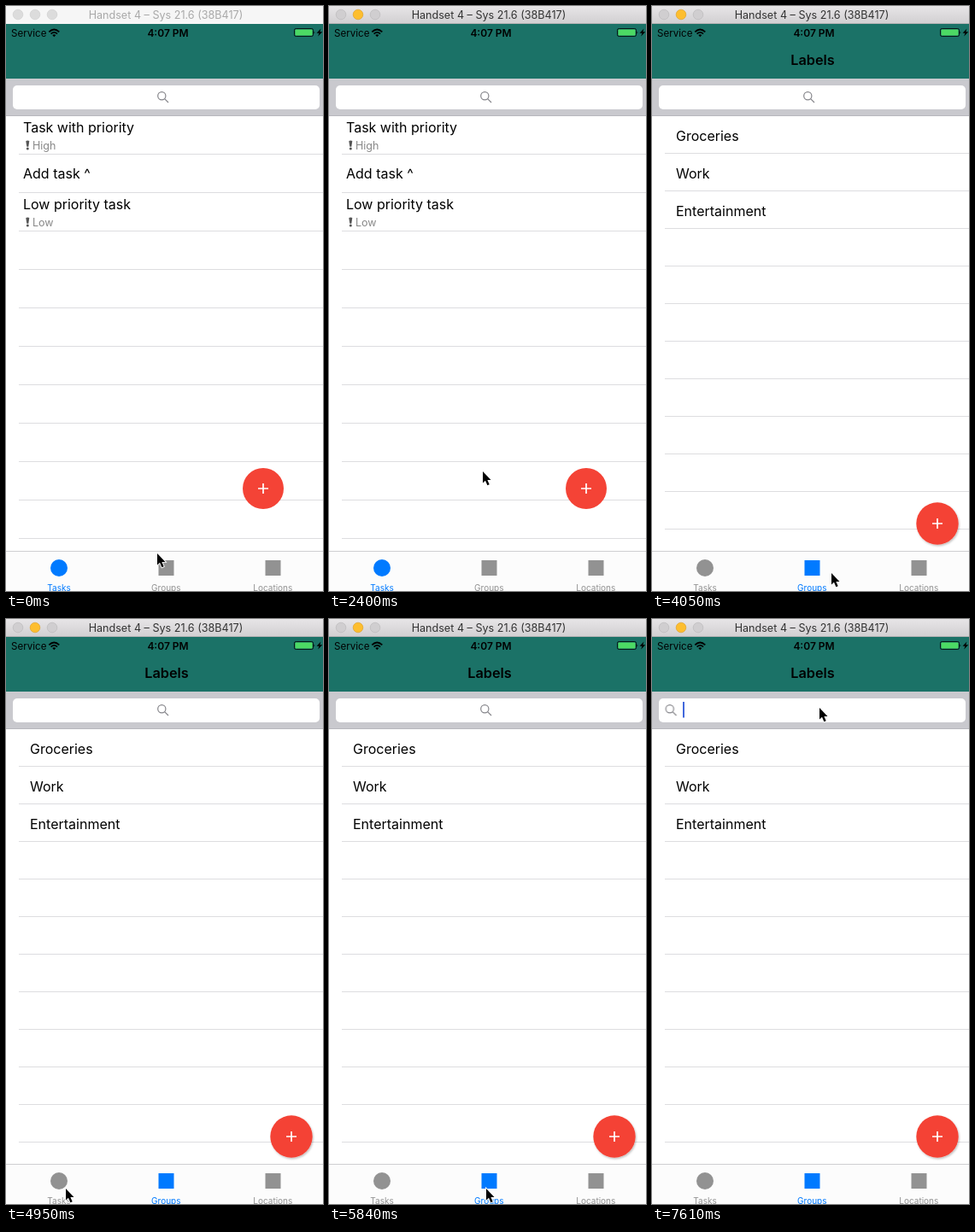
An HTML page that plays this animation: 371 by 685 pixels, repeating every 8 s.

```html
<!DOCTYPE html>
<html lang="en">
<head>
<meta charset="utf-8">
<title>Task list</title>
<style>
  html, body { margin: 0; width: 100%; height: 100%; overflow: hidden; background: #fff; }
  svg { display: block; width: 371px; height: 685px; font-family: Inter, "Open Sans", sans-serif; }
  .mid { text-anchor: middle; }
  .row { font-size: 16px; }
  .sub { font-size: 12.5px; fill: #888; }
  .tab { font-size: 10px; text-anchor: middle; }

  /* Everything changes in hard steps on one 8 s clock. */
  .anim { animation: 8s step-end infinite; }
  .idle { animation-name: idle; }
  .focused { animation-name: focused; }
  .tasks { animation-name: tasks; }
  .groups { animation-name: groups; }
  .tasks-tab { animation-name: tasks-tab; }
  .groups-tab { animation-name: groups-tab; }
  .glass { animation-name: glass; }
  .caret { animation-name: caret; }
  .pointer { animation-name: pointer; }

  @keyframes idle { 0% { visibility: visible } 30%, 100% { visibility: hidden } }
  @keyframes focused { 0% { visibility: hidden } 30%, 100% { visibility: visible } }
  @keyframes tasks {
    0%, 65.625% { visibility: visible }
    48.75%, 73%, 100% { visibility: hidden }
  }
  @keyframes groups {
    0%, 65.625% { visibility: hidden }
    48.75%, 73%, 100% { visibility: visible }
  }
  @keyframes tasks-tab {
    0%, 65.625% { color: #007aff }
    48.75%, 73%, 100% { color: #929292 }
  }
  @keyframes groups-tab {
    0%, 65.625% { color: #929292 }
    48.75%, 73%, 100% { color: #007aff }
  }
  @keyframes glass {
    0% { transform: none }
    91.375% { transform: translateX(-110px) }
    93.25%, 100% { transform: translateX(-161.5px) }
  }
  @keyframes caret { 0% { visibility: hidden } 93.25%, 100% { visibility: visible } }
  @keyframes pointer {
    0% { transform: translate(177px, 641px) }
    5.625% { transform: translate(178px, 590px) }
    7.5% { transform: translate(180px, 545px) }
    33.75% { transform: translate(181px, 556px) }
    35.625% { transform: translate(186px, 590px) }
    37.5% { transform: translate(192px, 622px) }
    39.375% { transform: translate(195px, 633px) }
    41.25% { transform: translate(190px, 650px) }
    43.125% { transform: translate(186px, 666px) }
    45% { transform: translate(185px, 660px) }
    50.625% { transform: translate(210px, 664px) }
    52.5% { transform: translate(257px, 667px) }
    54.375% { transform: translate(180px, 668px) }
    56.25% { transform: translate(98px, 668px) }
    61.875% { transform: translate(70px, 667px) }
    67.5% { transform: translate(77px, 664px) }
    69.25% { transform: translate(184px, 667px) }
    76.625% { transform: translate(184px, 649px) }
    78.5% { transform: translate(252px, 632px) }
    80.375% { transform: translate(270px, 620px) }
    82.25% { transform: translate(284px, 612px) }
    85.875% { transform: translate(140px, 130px) }
    87.75% { transform: translate(188px, 98px) }
    91.375%, 100% { transform: translate(196px, 104px) }
  }
</style>
</head>
<body>
<svg viewBox="0 0 371 685">
  <defs>
    <linearGradient id="bar" x2="0" y2="1">
      <stop stop-color="#e7e5e7"/><stop offset="1" stop-color="#d1cfd1"/>
    </linearGradient>
    <pattern id="lines45" width="371" height="45" y="173" patternUnits="userSpaceOnUse">
      <rect width="371" height="1" fill="#dddde0"/>
    </pattern>
    <pattern id="lines44" width="371" height="44" y="172" patternUnits="userSpaceOnUse">
      <rect width="371" height="1" fill="#dddde0"/>
    </pattern>
    <filter id="shade" x="-20%" y="-20%" width="150%" height="150%">
      <feDropShadow dx="1" dy="1.5" stdDeviation="1.2" flood-opacity=".25"/>
    </filter>
    <path id="plus" d="M-6 0H6M0-6V6" stroke="#fff" stroke-width="1.7"/>
    <g id="bang" fill="#555">
      <path d="M-2-5Q0-6.2 2-5L1 1.8H-1Z"/><circle cy="3.9" r="1.5"/>
    </g>
  </defs>

  <rect width="371" height="685" fill="#fff"/>

  <!-- Window title bar -->
  <g class="anim idle">
    <rect width="371" height="21" fill="#f6f6f6"/>
    <g fill="#dcdcdc" stroke="#d0d0d0" stroke-width=".7">
      <circle cx="14" cy="10" r="5.8"/><circle cx="34" cy="10" r="5.8"/><circle cx="54" cy="10" r="5.8"/>
    </g>
    <text class="mid" x="187" y="15" font-size="12.6" fill="#a9a9a9">Handset 4 – Sys 21.6 (38B417)</text>
  </g>
  <g class="anim focused">
    <rect width="371" height="21" fill="url(#bar)"/>
    <rect y="20" width="371" height="1" fill="#b4b2b4"/>
    <g fill="#d0ced0" stroke="#bcbabc" stroke-width=".7">
      <circle cx="14" cy="10" r="5.8"/><circle cx="54" cy="10" r="5.8"/>
      <circle cx="34" cy="10" r="5.8" fill="#fdbe2f" stroke="#e0a32a"/>
    </g>
    <text class="mid" x="187" y="15" font-size="12.6" fill="#333">Handset 4 – Sys 21.6 (38B417)</text>
  </g>

  <!-- Status and navigation -->
  <rect y="21" width="371" height="64" fill="#1b7267"/>
  <text x="6" y="35.5" font-size="11.6">Service</text>
  <g fill="none" stroke="#000" stroke-width="1.8">
    <path d="M50.3 30.3Q56.3 24.6 62.3 30.3M52.6 32.6Q56.3 29.2 60 32.6"/>
  </g>
  <path d="M54.3 34.1Q56.3 32.4 58.3 34.1L56.3 36.2Z"/>
  <text class="mid" x="189.5" y="35.5" font-size="12" font-weight="600">4:07 PM</text>
  <rect x="337.5" y="26.5" width="22" height="9" rx="1.8" fill="none" stroke="#000" stroke-width=".8"/>
  <rect x="338.5" y="27.5" width="20" height="7" rx="1" fill="#4cd964"/>
  <path d="M360.5 29.5Q362.3 31 360.5 32.8Z"/>
  <path d="M368.5 26.5L363.5 31.7H366.4L365.2 35.5L370.3 30.2H367.3Z"/>

  <!-- Search bar -->
  <rect y="85" width="371" height="44" fill="#c9c9ce"/>
  <rect y="128" width="371" height="1" fill="#b8b8bd"/>
  <rect x="8" y="93" width="359" height="28" rx="5" fill="#fff"/>
  <g class="anim glass" fill="none" stroke="#85858a" stroke-width="1.2">
    <circle cx="182.3" cy="105.3" r="4.6"/><path d="M185.6 108.6L190 113"/>
  </g>
  <rect class="anim caret" x="36" y="97" width="2" height="18.5" fill="#4268dc"/>

  <!-- Task list -->
  <g class="anim tasks">
    <rect x="15" y="173" width="356" height="465" fill="url(#lines45)"/>
    <g class="row">
      <text x="20" y="148">Task with priority</text>
      <text x="20" y="202">Add task ^</text>
      <text x="20" y="238">Low priority task</text>
    </g>
    <use href="#bang" x="25.3" y="163"/><text class="sub" x="31" y="167.5">High</text>
    <use href="#bang" x="25.3" y="253"/><text class="sub" x="31" y="257.5">Low</text>
    <circle cx="301" cy="565" r="24" fill="#f44336"/>
    <use href="#plus" x="301" y="565"/>
  </g>

  <!-- Label list -->
  <g class="anim groups">
    <text class="mid" x="188" y="69" font-size="16.3" font-weight="600">Labels</text>
    <rect x="15" y="172" width="356" height="466" fill="url(#lines44)"/>
    <g class="row">
      <text x="28" y="158">Groceries</text>
      <text x="28" y="202">Work</text>
      <text x="28" y="246">Entertainment</text>
    </g>
    <circle cx="334" cy="606" r="24.7" fill="#f44336" filter="url(#shade)"/>
    <use href="#plus" x="334" y="606"/>
  </g>

  <!-- Tab bar -->
  <rect y="638" width="371" height="47" fill="#fcfcfc"/>
  <rect y="638" width="371" height="1" fill="#cfcfd1"/>
  <g class="tab anim tasks-tab" fill="currentColor">
    <circle cx="62" cy="658" r="10"/><text x="62" y="684.5">Tasks</text>
  </g>
  <g class="tab anim groups-tab" fill="currentColor">
    <rect x="178.5" y="649" width="18" height="18"/><text x="187.3" y="684.5">Groups</text>
  </g>
  <g class="tab" fill="#929292">
    <rect x="303.5" y="649" width="18" height="18"/><text x="312.3" y="684.5">Locations</text>
  </g>

  <path class="anim pointer" d="M0 0V13.5L3 10.7L5.4 16.2L7.7 15.2L5.4 9.9H9.5Z"
        stroke="#fff" stroke-width="1.8" paint-order="stroke"/>
</svg>
</body>
</html>
```
